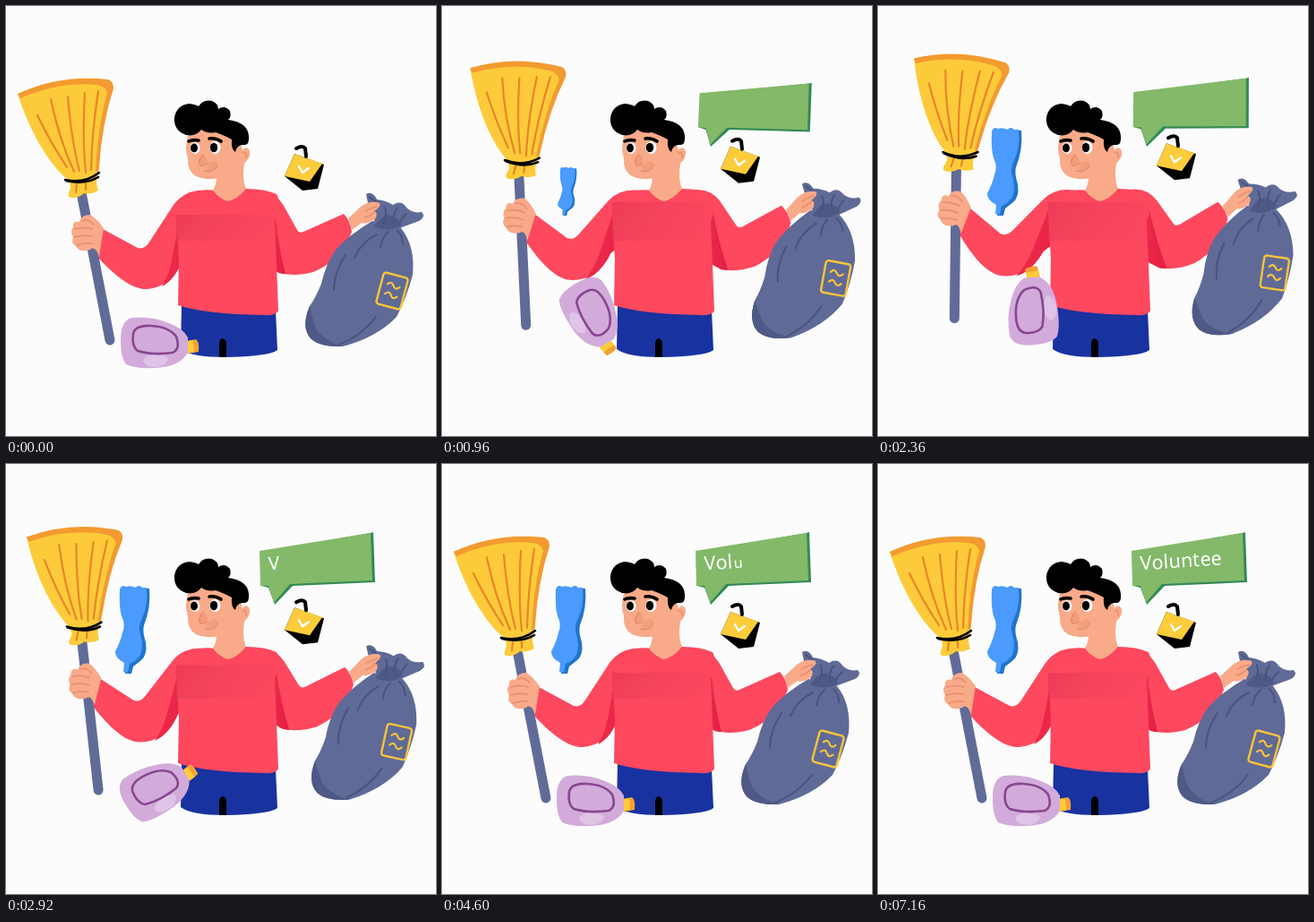
Recreate the animation shown at these times as an HTML page. Size 480 by 480 pixels, loop 7.2 s.

```html
<!DOCTYPE html>
<html lang="en">
<head>
<meta charset="utf-8">
<title>Clean-up volunteer</title>
<style>
html, body { margin: 0; width: 100%; height: 100%; overflow: hidden; background: #fcfcfc; }
svg { display: block; width: 100vw; height: 100vh; }
.line { fill: none; stroke-linecap: round; stroke-linejoin: round; }
.skin { fill: #f8aa89; }
.shirt { fill: #fe485e; }
.navy { fill: #5f6a97; }
.fold { stroke: #49537f; stroke-width: 2; }
.crease { stroke: #e88d6d; stroke-width: 1.6; }
.word { font: 21.6px "Noto Sans", "Open Sans", sans-serif; fill: #fff; }
</style>
</head>
<body>
<svg viewBox="0 0 480 480">
  <defs>
    <linearGradient id="chest" x1="0" y1="0" x2="1" y2=".25">
      <stop offset="0" stop-color="#e03150" stop-opacity=".55"/>
      <stop offset=".45" stop-color="#e43b58" stop-opacity=".4"/>
      <stop offset="1" stop-color="#ee4059" stop-opacity=".15"/>
    </linearGradient>
    <linearGradient id="shade" x1="0" y1="0" x2="1" y2="0">
      <stop offset="0" stop-color="#ee2a4a"/>
      <stop offset="1" stop-color="#e42143"/>
    </linearGradient>
  </defs>

  <g id="bubble">
    <path fill="#328a55" d="M286 98 L407 77 L410 76 L412 132 L320 136 L300 157 L293 138 L285 136Z"/>
    <path fill="#83b969" d="M283 97 L407 77 L409 130 L317 134 L299 155 L293 136 L284 136Z"/>
  </g>
  <g id="word"></g>

  <g id="can">
    <path fill="#1f74cd" d="M131 137 L160 139 Q162 160 154 180 Q152 186 156 199 Q158 213 151 219 L142 226 L140 234 L133 234Z"/>
    <path fill="#4a9bfd" d="M127 140 Q129 134 134 137 Q139 135 144 138 Q149 134 152 138 L157 138 Q159 158 152 172 Q147 182 150 190 Q154 203 150 213 Q146 220 138 223 L136 233 L131 232 L132 222 Q121 216 122 209 Q128 198 130 188 Q134 179 129 170 Q126 160 127 140Z"/>
  </g>

  <g id="cube">
    <path d="M322 165 L355 177 L348 204 L331 206 L311 190Z"/>
    <path fill="#fccc3b" d="M322 165 L353 176 L339 196 L311 190Z"/>
    <path class="line" stroke="#fff" stroke-width="2.4" d="M327 179 L331 186 L338 181"/>
    <path class="line" stroke="#000" stroke-width="4" d="M324 159 Q331 155 334 159 L335 168"/>
  </g>

  <g id="left">
    <path class="shirt" d="M108 249 L147 270 Q154 272 159 265 L187 222 Q199 205 224 206 L224 250 L198 280 C190 306 172 316 154 316 C136 314 118 297 103 281Z"/>
    <path fill="url(#shade)" d="M196 224 Q191 253 186 279 Q183 298 174 313 Q190 305 198 280 L224 250 L224 220Z"/>
    <path class="line" stroke="#606b98" stroke-width="11" d="M84 208 L116 373"/>
    <path fill="#fdcb3a" d="M13 98 Q62 77 117 85 Q121 90 115 107 Q103 145 103 186 Q99 196 103 206 Q94 211 87 209 Q81 215 72 214 Q68 213 71 206 Q74 200 68 193 C50 178 28 145 13 98Z"/>
    <path fill="#f39a30" d="M13 98 Q60 76 114 82 Q120 84 120 92 Q107 132 104 180 L103 186 L100 184 Q103 132 113 97 Q111 89 101 88 Q60 84 16 103Z"/>
    <path class="line" stroke="#ea8428" stroke-width="2.2" d="M35 122 Q50 153 68 180 M50 104 Q59 148 76 185 M69 101 Q73 150 82 184 M88 97 Q85 148 89 186 M103 95 Q96 140 95 183 M79 199 L78 208 M89 198 L89 205"/>
    <path class="line" stroke="#000" stroke-width="2.6" d="M66 194 Q87 199 104 186 M67 195 Q88 200 103 191"/>
    <path class="skin" d="M82 241 Q84 233 94 233 Q100 236 109 248 L104 279 Q99 267 94 272 Q82 276 78 268 Q72 265 75 258 Q71 252 75 247 Q74 239 82 241Z"/>
    <path class="line crease" d="M77 249 Q87 246 96 249 M76 258 Q86 255 96 257 M79 267 Q88 264 96 265 M85 240 Q92 237 98 244"/>
  </g>

  <g id="right">
    <path class="shirt" d="M280 207 Q300 206 310 223 L325 250 Q327 254 332 252 L377 232 Q384 239 386 252 Q375 284 343 297 Q320 303 303 297 L285 270Z"/>
    <path fill="url(#shade)" d="M285 230 L300 230 Q304 268 312 299 Q306 299 303 297 L285 285Z"/>
    <path class="navy" d="M409 240 Q385 254 369 271 Q357 287 352 310 Q346 325 339 335 Q329 358 340 371 Q350 381 376 380 Q414 370 436 347 Q447 326 454 300 Q457 268 441 248Z"/>
    <path fill="#4f5986" d="M339 335 Q329 358 340 371 Q350 381 376 380 Q352 373 345 358 Q342 348 339 335Z"/>
    <path class="navy" d="M402 210 Q409 206 414 216 Q424 217 432 222 Q441 216 447 225 Q454 232 464 230 Q469 235 461 240 Q453 243 442 247 Q426 257 410 247 Q414 235 405 225Z"/>
    <path fill="#4f5986" d="M411 246 Q423 229 432 235 Q440 237 442 245 Q427 254 411 246Z"/>
    <path class="line fold" d="M423 225 Q426 232 421 243 M437 225 Q431 233 433 243 M447 232 Q442 236 440 241 M406 213 L416 221 M414 255 Q396 264 389 281 M427 252 Q420 258 418 269 M437 251 Q443 257 443 266 M379 278 Q366 297 366 317 M372 378 Q397 368 413 347"/>
    <g transform="translate(431 318) rotate(15)" class="line" stroke="#fbc438">
      <rect x="-14" y="-18" width="28" height="36" rx="3" stroke-width="2.4"/>
      <path stroke-width="2.2" d="M-7 -6 Q-3 -11 0 -6 T7 -6 M-7 5 Q-3 0 0 5 T7 5"/>
    </g>
    <path class="skin" d="M382 237 Q390 230 396 224 Q404 218 414 219 Q420 220 416 225 L411 229 Q416 231 412 238 Q403 244 397 242 L386 250Z"/>
    <path class="line crease" d="M401 229 Q408 225 414 224 M400 236 Q406 235 411 230"/>
  </g>

  <path fill="#1832a0" d="M196 334 L301 340 L303 384 Q294 391 244 392 Q207 392 195 383Z"/>
  <path d="M238 392 L238 376 Q239 371 242 371 Q246 372 246 377 L246 392Z"/>
  <path class="shirt" d="M205 208 Q218 204 235 206 L268 204 Q289 204 302 210 Q308 220 300 240 L302 289 L304 340 Q302 346 288 345 Q222 344 192 334 L193 283 Q191 255 190 230 Q190 214 205 208Z"/>
  <rect id="patch" x="190" width="115" fill="url(#chest)"/>

  <path class="skin" d="M239 181 L268 168 Q262 190 268 204 Q257 217 247 218 Q237 214 231 206 Q235 199 235 190Z"/>
  <path class="skin" d="M203 145 Q222 132 257 138 L264 161 Q269 155 272 162 Q273 171 265 176 Q258 188 240 192 Q222 195 212 190 Q202 184 203 170 Q199 158 203 145Z"/>
  <path d="M201 144 Q187 139 188 125 Q190 111 204 109 Q212 110 215 112 Q220 104 230 106 Q237 109 237 115 Q244 110 250 117 Q252 124 248 127 Q270 130 271 145 Q272 155 266 155 Q258 154 256 163 Q251 160 252 149 Q245 145 234 141 Q225 143 218 138 Q212 146 201 144Z"/>
  <path class="line" stroke="#000" stroke-width="3.6" d="M204 151 Q208 149 215 150 M227 148 Q234 147 240 151"/>
  <ellipse cx="211" cy="158.500" rx="5.500" ry="6.500" fill="#fff"/>
  <ellipse cx="233.500" cy="158" rx="6" ry="7" fill="#fff"/>
  <ellipse cx="210" cy="158.500" rx="4" ry="5"/>
  <ellipse cx="232" cy="158" rx="4.200" ry="5.200"/>
  <path fill="#ee9674" d="M219 165 Q212 173 217 178 Q223 179 225 174 Q224 167 219 165Z" opacity=".65"/>
  <path class="line crease" d="M220 166 Q213 174 217 178 Q221 179 224 176 M222 184 Q233 187 236 177 M264 164 Q269 162 268 169"/>
  <path fill="#ee9674" opacity=".55" d="M223 181 Q226 172 234 173 Q239 179 232 184 Q227 186 223 181Z"/>

  <g id="bottle">
    <path fill="#f5a033" d="M202 374 L212 372 Q216 374 215 386 L203 388Z"/>
    <path fill="#ffcb3a" d="M202 374 L209 373 L210 387 L202 387Z"/>
    <path fill="#d3abdb" d="M128 376 Q127 352 140 348 Q162 346 182 354 Q198 360 203 370 L203 387 Q194 403 166 404 Q143 405 134 400 Q128 392 128 376Z"/>
    <path fill="#dfc4e7" d="M153 395 Q157 389 169 389 Q182 391 181 395 Q176 403 166 403 Q154 402 153 395Z"/>
    <path class="line" stroke="#87478f" stroke-width="2.6" d="M142 366 Q144 356 162 357 Q182 358 190 369 Q195 383 186 387 Q164 390 147 385 Q140 380 142 366Z"/>
  </g>
</svg>
<script>
const LOOP = 7200, STEP = 40, HALF = 1800, SWING = 3600;
const $ = id => document.getElementById(id);
const move = (node, value) => node.setAttribute('transform', value);
const ease = p => (1 - Math.cos(Math.PI * Math.min(1, Math.max(0, p)))) / 2;
const spin = (a, x, y) => `rotate(${a} ${x} ${y})`;
const grow = (k, x, y) => `translate(${x} ${y}) scale(${k}) translate(${-x} ${-y})`;

// time, scale, angle
const bubbleKeys = [[0, 0, 0], [640, .95, 0], [1620, 1.06, 17], [2590, 1, 0], [LOOP, 1, 0]];
function bubblePose(t) {
  const i = bubbleKeys.findIndex(k => k[0] > t);
  const a = bubbleKeys[i - 1], b = bubbleKeys[i];
  const p = ease((t - a[0]) / (b[0] - a[0]));
  return [1, 2].map(n => a[n] + (b[n] - a[n]) * p);
}

const TYPE_AT = 2400, TYPE_STEP = 600, TILT = -3.8;
const letterX = [293, 306, 319, 325, 338.5, 351.5, 360, 372];
const letters = [...'Voluntee'].map((ch, i) => {
  const node = document.createElementNS('http://www.w3.org/2000/svg', 'text');
  node.setAttribute('class', 'word');
  node.textContent = ch;
  $('word').append(node);
  return { node, x: letterX[i], y: 118.5 - (letterX[i] - 293) * .067, start: TYPE_AT + i * TYPE_STEP };
});

function draw(t) {
  const lift = t < SWING ? ease(t < HALF ? t / HALF : 2 - t / HALF) : 0;
  move($('left'), spin(15 * lift, 220, 211));
  move($('right'), spin(-8.5 * lift, 264, 206));
  move($('cube'), `translate(0 ${-15 * lift})`);
  move($('bottle'), `translate(0 ${-51 * lift}) ` + spin(360 * ease(t / SWING), 171, 375));
  move($('can'), grow(ease(t / HALF), 138, 234));

  const [size, angle] = bubblePose(t);
  move($('bubble'), spin(angle, 300, 156) + grow(size, 300, 156));

  const top = 233 - 14 * Math.min(1, lift * 2);
  $('patch').setAttribute('y', top);
  $('patch').setAttribute('height', 262 - top);

  for (const { node, x, y, start } of letters) {
    const k = ease((t - start) / TYPE_STEP);
    move(node, `translate(${x + 4 * (1 - k)} ${y}) rotate(${TILT}) scale(${k})`);
  }
}

const begin = performance.now();
function frame() {
  const t = (performance.now() - begin) % LOOP;
  draw(Math.floor(t / STEP) * STEP);
  requestAnimationFrame(frame);
}
draw(0);
requestAnimationFrame(frame);
</script>
</body>
</html>
```
